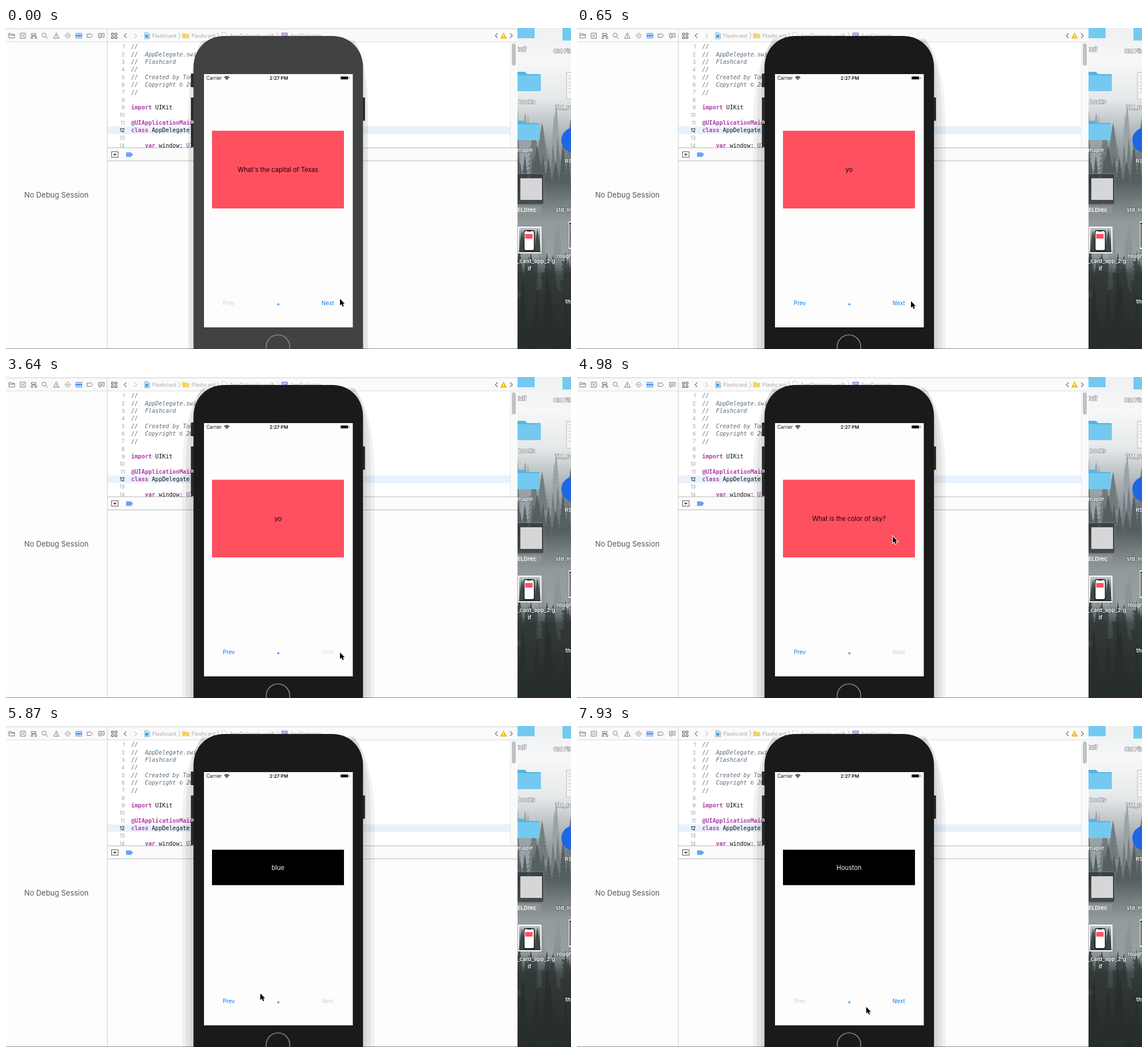
An HTML page that plays this animation: 993x564 px, repeating every 8 s.

```html
<!DOCTYPE html>
<html lang="en">
<head>
<meta charset="utf-8">
<title>Flashcard simulator</title>
<style>
html, body { margin: 0; width: 100%; height: 100%; overflow: hidden; background: #fff; }
svg { display: block; width: 100%; height: 100%; }
text { font-family: Inter, "Liberation Sans", sans-serif; white-space: pre; }
.code { font: 10.06px "DejaVu Sans Mono", monospace; }
.num { font-size: 8.6px; fill: #9c9c9c; text-anchor: end; }
.crumb { font-size: 9.1px; fill: #a9a9a9; }
.label { font-size: 9.6px; font-weight: 600; fill: #fff; paint-order: stroke; stroke: rgba(30,36,40,.45); stroke-width: 1.5px; }
.tool { fill: none; stroke: #7b7b7b; stroke-width: 1; }
.mid { text-anchor: middle; }
.btn { font-size: 10px; }
</style>
</head>
<body>
<svg id="stage" viewBox="0 0 993 564" preserveAspectRatio="none"></svg>
<script>
const LOOP = 8000;
const BLUE = '#0a7ff5', GREY = '#cfcfd1';

const rect = (x, y, w, h, fill, extra = '') =>
  `<rect x="${x}" y="${y}" width="${w}" height="${h}" fill="${fill}" ${extra}/>`;
const path = (d, fill, extra = '') => `<path d="${d}" fill="${fill}" ${extra}/>`;
const line = (d, stroke, width = 1) => path(d, 'none', `stroke="${stroke}" stroke-width="${width}"`);
const text = (x, y, str, cls, extra = '') => `<text x="${x}" y="${y}" class="${cls}" ${extra}>${str}</text>`;
const tool = d => `<path class="tool" d="${d}"/>`;

function seeded(seed) {
  return () => (seed = (seed * 16807) % 2147483647) / 2147483647;
}

// Jagged conifer with its tip at (x, y)
function tree(x, y, h, w, fill) {
  const n = 12, left = [], right = [];
  for (let i = 1; i <= n; i++) {
    const r = w * i / n, ty = y + h * i / n;
    right.push(`${x + r} ${ty}`, `${x + r * .5} ${ty - 2}`);
    left.unshift(`${x - r * .5} ${ty - 2}`, `${x - r} ${ty}`);
  }
  return path(`M${x} ${y}L${right.join('L')}L${left.join('L')}Z`, fill);
}

function forest() {
  const rnd = seeded(77);
  let s = rect(899, 0, 94, 564, 'url(#sky)');
  const row = (count, top, spread, h, w, fill) => {
    for (let i = 0; i < count; i++)
      s += tree(897 + rnd() * 98, top + rnd() * spread, h * (.7 + rnd() * .5), w * (.7 + rnd() * .6), fill);
  };
  row(12, 120, 50, 100, 12, '#9aa2a6');
  row(12, 160, 50, 100, 13, '#727c7f');
  row(12, 205, 50, 90, 14, '#555f61');
  s += rect(899, 270, 94, 140, 'url(#fog)');
  row(9, 335, 50, 90, 10, '#8b9496');
  row(12, 385, 35, 110, 15, '#3d4645');
  s += rect(899, 400, 94, 164, 'url(#dusk)');
  row(9, 425, 60, 130, 15, '#272e2d');
  return s;
}

function folder(x, y, w = 43, h = 34) {
  return path(`M${x} ${y + 2}q0-2 2-2h13l4 4h${w - 21}q2 0 2 2v${h - 8}q0 2-2 2h${4 - w}q-2 0-2-2Z`, '#55b4e2') +
    rect(x, y + 6, w, h - 6, '#74c9f0', 'rx="2"');
}

function desktop() {
  const labels = [
    [893, 40.5, 'stuff'], [962, 43.5, 'Old Files'], [901, 132.5, 'books'], [965, 142.5, 'TM_resume'],
    [898, 218, 'maple'], [982, 236.5, 'RStudio'], [966, 322.5, 'std_list'], [968, 403.5, 'rough'],
    [898, 413, '_card_app_2.g'], [917, 425.5, 'if'], [983, 483.5, 'thumbs']
  ];
  return forest() +
    folder(886, -16) + folder(978, -12) + folder(897, 77) + folder(895, 163) +
    rect(985, 78, 20, 47, '#f4f4f4', 'stroke="#b5b9bb"') +
    line('M989 84h6M989 89h6M989 95h6M989 101h6M989 107h6M989 113h6', '#b4b4b4') +
    `<circle cx="998" cy="197" r="22" fill="#1f66e5"/>` +
    rect(894, 256, 51, 54, '#2d3232', 'fill-opacity=".65" stroke="#818788" rx="3"') +
    rect(904, 264, 38, 38, '#d6d6d8') +
    rect(890, 313, 51, 13, '#8d9293', 'rx="2"') +
    text(892, 323, 'VELDrec', 'label', 'style="stroke:none"') +
    rect(989, 340, 12, 48, '#fff') + line('M991.5 342v44', '#222', 3) + line('M991.5 344v42', '#fff', 1) +
    rect(900, 349, 41, 47, '#fff') + rect(902, 351, 37, 43, 'url(#mini)') +
    tree(907, 356, 38, 7, '#3d4746') + tree(934, 354, 40, 7, '#3d4746') +
    rect(910.5, 356, 18, 35, '#fff', 'rx="3" stroke="#151515" stroke-width="1.5"') +
    rect(916, 355.5, 7, 2, '#151515') + rect(912.5, 362, 13, 8, '#ff5060') +
    labels.map(l => text(l[0], l[1], l[2], 'label')).join('');
}

function toolbar() {
  const chevron = (x, c) => line(`M${x} 8l3 5.5-3 5.5`, c);
  const file = (x, c, f) => path(`M${x} 8h6l3 3v8h-9Z`, f, `stroke="${c}" stroke-width=".8"`);
  return rect(0, 0, 899, 24, '#fafafa') +
    line('M0 1.5H899', '#d2d2d2') + line('M0 24.5H899', '#dcdcdc') +
    tool('M5 9.5h4l1 1.5h5v6.5h-10ZM5 12.5h10') +
    tool('M25 9h9v9h-9ZM27 11l5 5M32 11l-5 5') +
    tool('M44.5 9.5h8v3h-8ZM44 15.5h3v3h-3ZM51 15.5h3v3h-3ZM48.5 12.5v2M45.5 15v-1h7v1') +
    tool('M70.5 12.5a3.5 3.5 0 1 1-7 0a3.5 3.5 0 1 1 7 0M69.5 15l4 4') +
    tool('M88.5 8.5l5 9.5h-10ZM88.5 12v3M88.5 16v1') +
    tool('M108.5 8.5l5 5-5 5-5-5ZM106.5 13.5h4') +
    line('M122 9.5h12M122 17.5h12', '#2f83ea') + rect(122, 11.5, 12, 4, '#4c95ee') +
    line('M125.5 11.5v4M130.5 11.5v4', '#a9cdf7', .8) +
    tool('M142.5 10.5h7l3 3-3 3h-7Z') +
    tool('M162.5 9.5h10v6.5h-6l-2 2.5v-2.5h-2ZM164.5 12h6M164.5 14h5') +
    line('M185.5 9h3.5v3.5h-3.5ZM191.5 9h3.5v3.5h-3.5ZM185.5 15h3.5v3.5h-3.5ZM191.5 15h3.5v3.5h-3.5Z', '#4a4a4a') +
    line('M211.5 9.5l-4 4 4 4', '#777', 1.2) + line('M226 9.5l4 4-4 4', '#c9c9c9', 1.2) +
    file(243.5, '#6fb4e6', '#bfe0f6') + rect(245, 12, 5, 5, '#4c9fdf') +
    text(257, 16.8, 'Flashcard', 'crumb') + chevron(303, '#b5b5b5') +
    path('M309.5 9h5l1.5 1.5h6v7.5h-12.5Z', '#f3d36c') +
    text(326, 16.8, 'Flashcard', 'crumb') + chevron(371, '#b5b5b5') +
    file(379.5, '#c5c5c5', '#fff') + text(393, 16.8, 'AppDelegate.swift', 'crumb') + chevron(476, '#b5b5b5') +
    rect(484, 8, 11.5, 11, '#b891d3', 'rx="2"') + text(486.5, 16.8, 'C', '', 'font-size="9" fill="#fff"') +
    text(499, 16.8, 'AppDelegate', 'crumb') +
    line('M864 9.5l-4 4 4 4M886 9.5l4 4-4 4', '#6d6d6d', 1.1) +
    path('M874.5 8.5l5 9.5h-10Z', '#f7c30b', 'stroke="#f0b400" stroke-linejoin="round"') +
    line('M874.5 11.5v3.5M874.5 16v1.2', '#fff', 1.2);
}

function editor() {
  const key = s => `<tspan font-weight="bold" fill="#ad3da4">${s}</tspan>`;
  const note = s => `<tspan font-style="italic" fill="#5d6c79">${s}</tspan>`;
  const code = [
    note('//'), note('//  AppDelegate.swift'), note('//  Flashcard'), note('//'),
    note('//  Created by Tom'), note('//  Copyright © 2018'), note('//'), '',
    key('import') + ' UIKit', '', key('@UIApplicationMain'),
    key('class') + ' AppDelegate: ', '',
    '    ' + key('var') + ' window: <tspan fill="#703daa">UIWindow</tspan>'
  ];
  let s = rect(178, 25, 721, 186, '#fff') + rect(178, 173, 708, 13.4, '#e8f2fd');
  code.forEach((c, i) => {
    const y = 36.4 + i * 13.35;
    s += text(208.5, y - .2, i + 1, 'num', i === 11 ? 'style="fill:#111;font-weight:500"' : '');
    s += text(220, y, c, 'code', 'fill="#111"');
  });
  return s + rect(886, 25, 13, 186, '#fafafa') + line('M886.5 25V211', '#e6e6e6') +
    rect(889, 27, 7, 39, '#c2c2c2', 'rx="3.5"');
}

function ide() {
  return rect(0, 0, 899, 564, '#fdfdfd') + editor() + toolbar() +
    rect(178, 211, 721, 23, '#fbfbfb') +
    line('M178 210.5H899M178 233.5H899', '#b9b9b9') + line('M178 2V563', '#cbcbcb') +
    rect(185.5, 217.5, 11.5, 9.5, '#fff', 'stroke="#555"') + path('M188 221h6.5l-3.25 3.5Z', '#444') +
    path('M211 218.5h8.5l4 4-4 4H211Z', '#6ba3ee') +
    text(88.5, 297.7, 'No Debug Session', 'mid', 'font-size="12.95" fill="#575757"') +
    line('M0 563.5H899', '#8d8d8d');
}

// One band of the soft shadow, reaching d pixels past the phone
function band(d, top, alpha) {
  const l = 330 - d, r = 627 + d;
  return path(`M345 ${top}C${l + d * .5} ${top + 25} ${l} ${top + 85} ${l} ${top + 150}V564H${r}V${top + 150}` +
    `C${r} ${top + 85} ${r - d * .5} ${top + 25} 612 ${top}Z`, '#000', `fill-opacity="${alpha}"`);
}

function phone() {
  return `<g id="idle">${band(9.5, 22, .08)}${band(6, 22, .02)}</g>` +
    `<g id="focus">${band(20.5, 22, .05)}${band(14, 20, .06)}${band(7, 18, .05)}</g>` +
    path('M325 81q0-1 1-1h5v24h-5q-1 0-1-1ZM325 123q0-1 1-1h5v41h-5q-1 0-1-1ZM325 169q0-1 1-1h5v41h-5q-1 0-1-1ZM626 122h4q1 0 1 1v39q0 1-1 1h-4Z', '#2a2c2b') +
    path('M329.5 570V70C329.5 37 352 14 385 14H572C605 14 627.5 37 627.5 70V570Z', '#1a1a1a', 'id="bezel"') +
    `<circle cx="478" cy="560" r="20.7" fill="none" stroke="#858585" stroke-width="1.6"/>` +
    rect(348, 81, 261.5, 445, '#fdfdfd') +
    text(352, 90.8, 'Carrier', '', 'font-size="8.3" fill="#111"') +
    line('M383.6 87.3q4.4-4 8.8 0M385.3 89q2.7-2.4 5.4 0', '#111', 1.3) + path('M386.5 90l1.5 1.7 1.5-1.7q-1.5-1-3 0Z', '#111') +
    text(479.5, 90.8, '2:27 PM', 'mid', 'font-size="8.2" font-weight="600" fill="#111"') +
    rect(587.5, 84.5, 14.5, 6.5, 'none', 'rx="1.8" stroke="#888" stroke-width=".7"') +
    rect(588.5, 85.4, 12.5, 4.7, '#000', 'rx="1"') + rect(603, 86.5, 1.2, 2.5, '#777') +
    rect(362, 180.5, 232, 136.5, '#ff5060', 'id="card"') +
    text(478, 253, '', 'mid', 'id="words" font-size="11.1"') +
    text(381, 487.1, 'Prev', 'btn', 'id="prev"') +
    text(478.7, 487.7, '+', 'btn mid', `fill="${BLUE}" font-weight="500"`) +
    text(554.5, 487.1, 'Next', 'btn', 'id="next"');
}

const stop = (o, c, a = 1) => `<stop offset="${o}" stop-color="${c}" stop-opacity="${a}"/>`;
const gradient = (id, stops) => `<linearGradient id="${id}" x2="0" y2="1">${stops}</linearGradient>`;

document.getElementById('stage').innerHTML =
  `<defs>${gradient('sky', stop(0, '#eef0f2') + stop(.1, '#f6f7f8') + stop(.22, '#e6e9ea') + stop(.34, '#a7afb2') + stop(.5, '#5f696b') + stop(1, '#2b3231'))}
  ${gradient('fog', stop(0, '#a4adb0', 0) + stop(.5, '#a7aeb0', .75) + stop(1, '#a3aaac', .9))}
  ${gradient('dusk', stop(0, '#4b5555', 0) + stop(.2, '#2e3534', .75) + stop(1, '#252b2a', 1))}
  ${gradient('mini', stop(0, '#c3c9cc') + stop(.5, '#6b7678') + stop(1, '#2d3534'))}</defs>` +
  desktop() + ide() + phone() +
  `<path id="arrow" d="M0 0V11.5L2.7 9.1 4.7 13.5 6.7 12.6 4.8 8.4H8.3Z" fill="#000" stroke="#fff" stroke-width="2" paint-order="stroke"/>`;

const $ = id => document.getElementById(id);
const TEXAS = "What's the capital of Texas", SKY = 'What is the color of sky?';

// Each entry holds from its time on; prev and next are strengths, -1 is disabled
const steps = [
  [0, { on: false, words: TEXAS, back: false, prev: -1, next: 1, x: 587, y: 476 }],
  [150, { on: true, next: .18 }],
  [360, { words: 'yo', prev: 1, next: .55 }],
  [500, { next: .85 }],
  [650, { next: 1, y: 480 }],
  [800, { y: 486 }],
  [1100, { y: 485 }],
  [1250, { y: 484 }],
  [3640, { next: .18 }],
  [3790, { words: SKY, next: .3 }],
  [3940, { next: -1 }],
  [4540, { x: 583, y: 460 }],
  [4690, { x: 570, y: 370 }],
  [4840, { x: 555, y: 280 }],
  [4990, { x: 549, y: 253.5 }],
  [5130, { words: 'blue', back: true }],
  [5280, { x: 543, y: 290 }],
  [5420, { x: 512, y: 400 }],
  [5570, { x: 485.5, y: 456 }],
  [5720, { x: 468, y: 463 }],
  [5870, { x: 447, y: 470 }],
  [6020, { x: 430, y: 476 }],
  [6170, { x: 422, y: 479 }],
  [6320, { x: 420.3, y: 479.7 }],
  [6610, { prev: .18 }],
  [6760, { words: 'v', prev: .6, next: 1 }],
  [6910, { prev: .85 }],
  [7050, { prev: 1 }],
  [7200, { prev: .18 }],
  [7350, { words: 'Houston', prev: -1 }],
  [7640, { x: 395, y: 484 }],
  [7790, { x: 452, y: 490 }],
  [7930, { x: 508.3, y: 493.5 }]
];

function stateAt(t) {
  const s = {};
  for (const [at, change] of steps) if (at <= t) Object.assign(s, change);
  return s;
}

function set(id, attrs) {
  for (const k in attrs) $(id).setAttribute(k, attrs[k]);
}

function button(id, v) {
  set(id, { fill: v < 0 ? GREY : BLUE, 'fill-opacity': v < 0 ? 1 : v });
}

function render(t) {
  const s = stateAt(t);
  set('idle', { visibility: s.on ? 'hidden' : 'visible' });
  set('focus', { visibility: s.on ? 'visible' : 'hidden' });
  set('bezel', { fill: s.on ? '#1a1a1a' : '#404342' });
  set('card', s.back ? { y: 217.4, height: 62.2, fill: '#000' } : { y: 180.5, height: 136.5, fill: '#ff5060' });
  set('words', { fill: s.back ? '#f2f2f2' : '#160508' });
  if ($('words').textContent !== s.words) $('words').textContent = s.words;
  button('prev', s.prev);
  button('next', s.next);
  set('arrow', { transform: `translate(${s.x} ${s.y})` });
}

const start = performance.now();
function tick() {
  render((performance.now() - start) % LOOP);
  requestAnimationFrame(tick);
}
tick();
</script>
</body>
</html>
```
